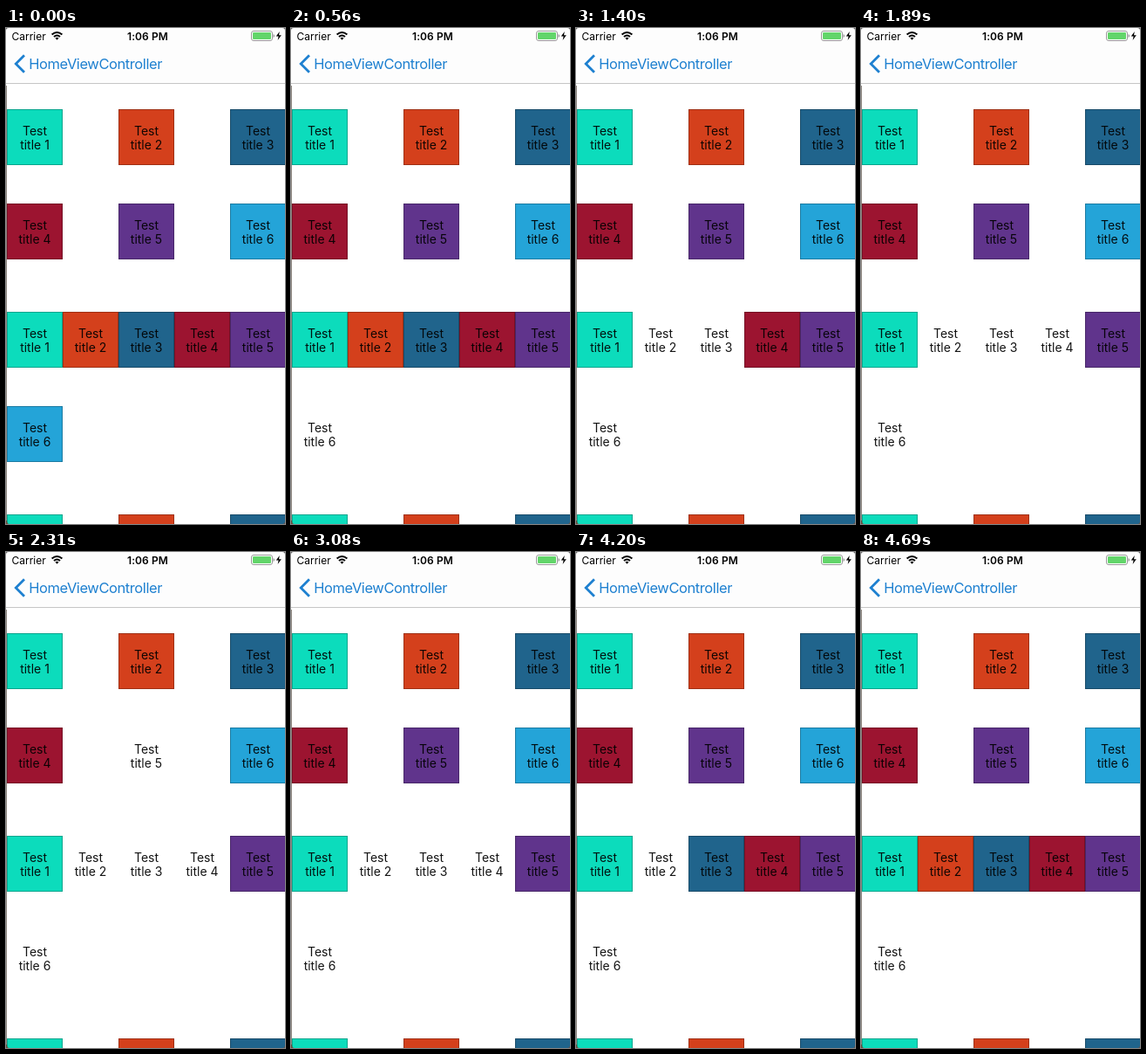
Write an HTML page that moves like this. It is 320x568 px and loops after 4760 ms.

```html
<!DOCTYPE html>
<html lang="en">
<head>
<meta charset="utf-8">
<title>Tile selection</title>
<style>
  html, body { margin: 0; width: 100%; height: 100%; overflow: hidden; background: #fff; }
  svg { display: block; width: 320px; height: 568px; font-family: Inter, Roboto, sans-serif; }
  .label { font-size: 14px; text-anchor: middle; fill-opacity: .92; }
  .edge { fill: none; stroke: #000; stroke-opacity: .25; }
  .status { font-size: 12px; }
  .clock { font-weight: 600; text-anchor: middle; letter-spacing: .1px; }
  .back { font-size: 16.5px; letter-spacing: -.42px; fill: #1e80d0; }
</style>
</head>
<body>
<svg id="stage" viewBox="0 0 320 568">
  <rect width="320" height="568" fill="#fff"/>
  <rect width="320" height="63" fill="#fdfdfd"/>
  <rect y="63" width="320" height="1" fill="#c6c6c6"/>

  <text class="status" x="6.5" y="13.5">Carrier</text>
  <g fill="none" stroke="#000" stroke-width="2">
    <path d="M52.6 7.6Q58.5 2.4 64.4 7.6"/>
    <path d="M55 10.1Q58.5 7 62 10.1"/>
  </g>
  <path d="M56.5 11.6Q58.5 10 60.5 11.6L58.5 13.8Z"/>
  <text class="status clock" x="162.5" y="13.5">1:06 PM</text>
  <rect x="281.5" y="3.5" width="24" height="11" rx="2.5" fill="#fff" stroke="#999"/>
  <rect x="283" y="5" width="21" height="8" rx="1.2" fill="#62d56a"/>
  <path d="M306.5 7q1.6 .4 1.6 2t-1.6 2z" fill="#999"/>
  <path d="M313.8 4L309.8 9.6H312.6L311.6 14L315.8 8.2H313Z"/>

  <path d="M21 31.3L11.3 41L21 50.7" fill="none" stroke="#1e80d0" stroke-width="2.8"/>
  <text class="back" x="26.2" y="47">HomeViewController</text>

  <g id="tiles"></g>
  <rect y="66" width="1" height="502" fill="#8c857e"/>
  <path d="M0 0H3Q0 0 0 3Z" fill="#555"/>
  <path d="M320 0H317Q320 0 320 3Z" fill="#555"/>
  <path d="M0 568H4Q1 568 1 564H0Z" fill="#6b5140"/>
  <path d="M320 568H317Q320 568 320 565Z" fill="#6b5140"/>
</svg>
<script>
const LOOP = 4760, SIZE = 64;
const colors = ['#0cdcbc', '#d4401c', '#20648c', '#9c1430', '#60348c', '#24a4d8'];

// Grids: top edge, tiles per row, column step
const grids = [
  { top: 93, cols: 3, step: 128 },
  { top: 325, cols: 5, step: 64 },
  { top: 557, cols: 3, step: 128 }
];

// Grid, tile, time hidden, time shown again
const taps = [
  [1, 5, 280, LOOP],
  [1, 1, 840, 4410],
  [1, 2, 1190, 3850],
  [1, 3, 1680, 3430],
  [0, 4, 2100, 2660]
];

const layer = document.getElementById('tiles');

function add(parent, name, attrs = {}, text = '') {
  const el = document.createElementNS('http://www.w3.org/2000/svg', name);
  for (const key in attrs) el.setAttribute(key, attrs[key]);
  el.textContent = text;
  return parent.appendChild(el);
}

const tiles = grids.map(({ top, cols, step }) => colors.map((fill, i) => {
  const x = 1 + (i % cols) * step;
  const y = top + Math.floor(i / cols) * 108;
  const tile = add(layer, 'g');
  add(tile, 'rect', { x, y, width: SIZE, height: SIZE, fill });
  add(tile, 'rect', { class: 'edge', x: x + .5, y: y + .5, width: SIZE - 1, height: SIZE - 1 });
  add(layer, 'text', { class: 'label', x: x + 32, y: y + 30 }, 'Test');
  add(layer, 'text', { class: 'label', x: x + 32, y: y + 46 }, `title ${i + 1}`);
  return tile;
}));

for (const [grid, i, off, on] of taps) {
  const frames = [[0, 1], [off, 0]];
  if (on < LOOP) frames.push([on, 1]);
  frames.push([LOOP, frames[frames.length - 1][1]]);
  tiles[grid][i].animate(
    frames.map(([time, opacity]) => ({ offset: time / LOOP, opacity, easing: 'step-end' })),
    { duration: LOOP, iterations: Infinity }
  ).startTime = 0;
}
</script>
</body>
</html>
```
